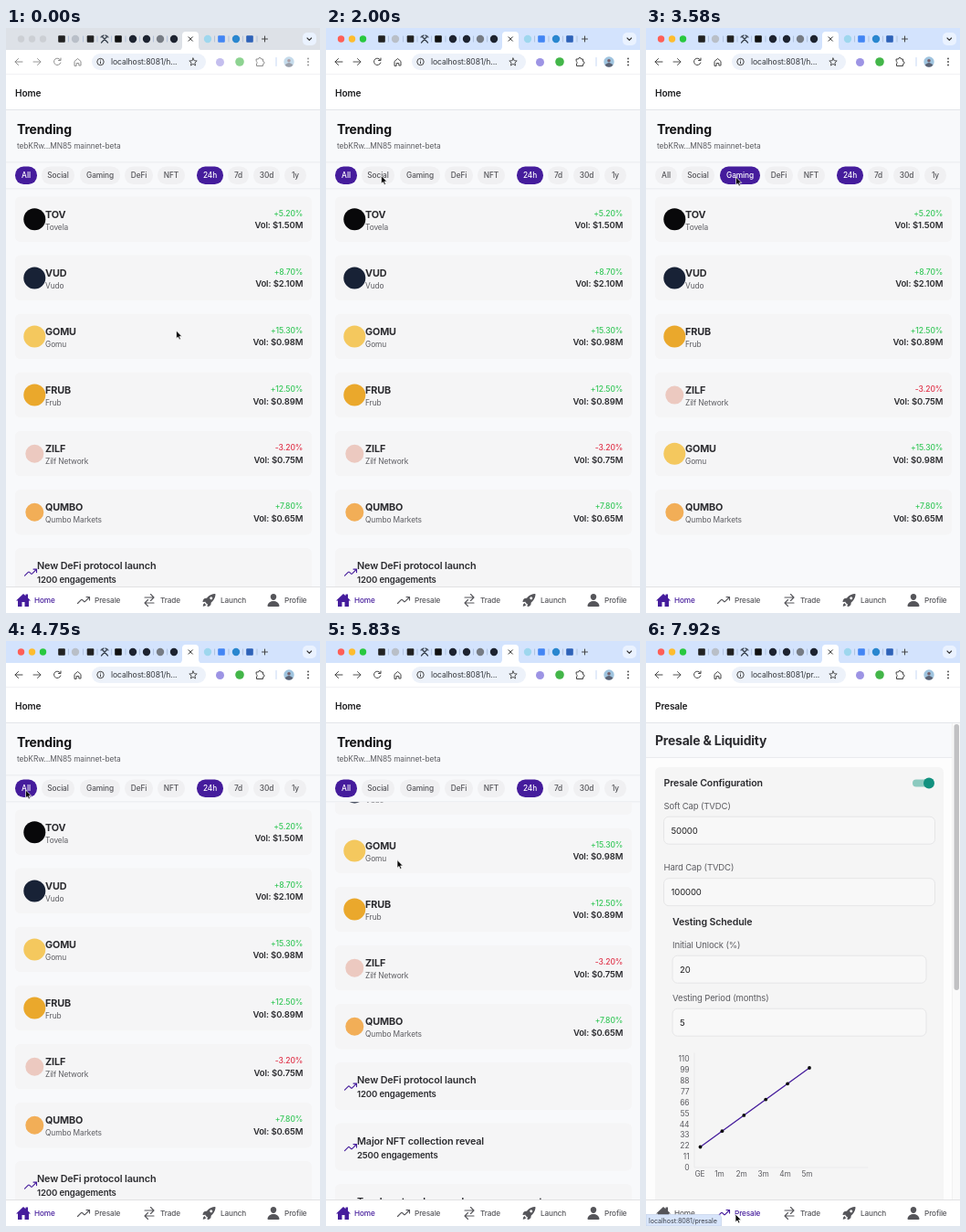
Write an HTML page that moves like this. It is 344x640 px and loops after 8 s.

```html
<!DOCTYPE html>
<html lang="en">
<head>
<meta charset="utf-8">
<title>Token dashboard</title>
<style>
  html, body { margin: 0; width: 100%; height: 100%; overflow: hidden; background: #fff; }
  svg { display: block; width: 100vw; height: 100vh; }
  text { font-family: Inter, sans-serif; white-space: pre; }
</style>
</head>
<body>
<svg id="stage" viewBox="0 0 344 640" preserveAspectRatio="none"></svg>
<script>
const LOOP = 8000;
const PURPLE = '#451c9c', GREY = '#55555a', MUTED = '#5c5c61', INK = '#2b2b2f';
const stage = document.getElementById('stage');

function add(parent, tag, attrs = {}, content) {
  const node = document.createElementNS('http://www.w3.org/2000/svg', tag);
  for (const key in attrs) node.setAttribute(key, attrs[key]);
  if (content !== undefined) node.textContent = content;
  parent.appendChild(node);
  return node;
}
const group = (parent, attrs) => add(parent, 'g', attrs);
const rect = (parent, x, y, width, height, fill, rx = 0, more = {}) =>
  add(parent, 'rect', { x, y, width, height, fill, rx, ...more });
const circle = (parent, cx, cy, r, fill, more = {}) =>
  add(parent, 'circle', { cx, cy, r, fill, ...more });
const line = (parent, d, stroke, width = 1, more = {}) =>
  add(parent, 'path', { d, stroke, 'stroke-width': width, fill: 'none',
    'stroke-linecap': 'round', 'stroke-linejoin': 'round', ...more });

// Places a label by its vertical centre.
function label(parent, x, middle, content, size, fill = INK, weight = 400, anchor = 'start') {
  return add(parent, 'text', { x, y: middle + size * 0.36, fill, 'font-size': size,
    'font-weight': weight, 'text-anchor': anchor, 'letter-spacing': -size * 0.012 }, content);
}

// Icons are drawn on a 512 unit square and shown at 16 px.
const OUTLINES = {
  trend: 'M352 144h112v112M48 368l121-121q23-22 46 0l50 50q23 22 46 0L448 160',
  swap: 'M304 48l112 112-112 112M398 160H96M208 464L96 352l112-112M114 352h302'
};
const SOLIDS = {
  home: 'M416 175V48h-80v58L256 32 0 272h64v208h144V320h96v160h144V272h64z',
  rocket: 'M478 38C420 20 280 70 207 145q-20 20-36 42C80 180 45 230 32 308q0 12 11 11l87-10q0 25 7 32l34 34q7 7 31 7l-9 87q0 12 11 11c78-13 128-50 121-139q22-16 42-36C441 232 492 100 478 38zM294 218a48 48 0 1 1 68 0a48 48 0 0 1-68 0zM109 353c-45 10-66 55-69 119c64-3 109-24 119-69c-25 10-60 0-50-50z',
  person: 'M256 32c-62 0-108 48-104 113 5 61 51 111 104 111s99-50 104-111C364 80 318 32 256 32zM432 480H80q-38-4-31-40c18-95 107-152 207-152s189 57 207 152q7 36-31 40z'
};
function icon(parent, name, cx, cy, color = 'currentColor') {
  const transform = `translate(${cx} ${cy}) scale(${16 / 512}) translate(-256 -256)`;
  return OUTLINES[name]
    ? line(parent, OUTLINES[name], color, 36, { transform })
    : add(parent, 'path', { d: SOLIDS[name], fill: color, 'fill-rule': 'evenodd', transform });
}

/* ---------- browser frame ---------- */
const frame = group(stage);
const strip = rect(frame, 0, 0, 344, 30, '#d3e3fd');
const lights = ['#ff5f57', '#febc2e', '#28c840'].map((color, i) =>
  ({ color, node: circle(frame, 16.5 + i * 12, 12, 3.7, color) }));

[[61, 's', '#222'], [76, 'c', '#b9bfc8'], [92.5, 's', '#222'], [123, 's', '#111'],
 [139, 'c', '#1d2330'], [154, 'c', '#1d2330'], [169, 'c', '#777c84'], [184, 'c', '#1d2330'],
 [221, 'c', '#9ed7ee'], [236, 's', '#4285f4'], [252, 'c', '#2a87cf'], [267, 's', '#2e62b8']
].forEach(([x, shape, color]) => shape === 's'
  ? rect(frame, x - 3.8, 8.2, 7.6, 7.6, color, 1)
  : circle(frame, x, 12, 4.2, color));
line(frame, 'M105 9l6.500 7M111 9l-6.500 7M104 10l3-2M109 8l3 2', '#39424e', 1.3);
[68.5, 84.5, 100, 115.5, 131, 146.5, 161.5, 176.5, 228.5, 244, 259.5, 275].forEach(x =>
  line(frame, `M${x} 9v6`, '#a3b5d3', 0.7));
add(frame, 'path', { d: 'M189 25q4-1 4-5V8q0-4 4-4h10q4 0 4 4v12q0 4 4 5z', fill: '#fff' });
line(frame, 'M200 9.800l4.400 4.400m0-4.400l-4.400 4.400', '#333', 1);
line(frame, 'M280.500 12h6m-3-3v6', '#444', 1);
rect(frame, 325, 5, 15, 14, '#eaf2ff', 5);
line(frame, 'M330 11l2.300 2.300 2.300-2.300', '#333', 1.1);
rect(frame, 0, 24, 344, 27, '#fff');

const tools = group(frame);
line(tools, 'M18 37h-8m3.500-3.500L10 37l3.500 3.500', '#444', 1);
line(tools, 'M30 37h8m-3.500-3.500L38 37l-3.500 3.500', '#555', 1);
line(tools, 'M59.500 35a3.700 3.700 0 1 0 .3 3M60 33v2.500h-2.500', '#444', 1);
line(tools, 'M75 41v-4.500l3.500-3 3.500 3V41h-2.200v-2.500h-2.600V41z', '#444', 1);
rect(frame, 94, 28, 125, 18, '#edf2fa', 9);
circle(frame, 103.5, 37, 3.7, 'none', { stroke: '#444', 'stroke-width': 1 });
line(frame, 'M103.500 36.800v2M103.500 35v.1', '#444', 1);
const address = label(frame, 115, 37, '', 8.6, '#34373c');
line(frame, 'M205 33l1.200 2.700 3 .3-2.300 2 .7 3-2.600-1.600-2.600 1.600.7-3-2.300-2 3-.3z', '#444', 0.9);
circle(tools, 234.5, 37.5, 4.5, '#9d94e4');
circle(tools, 256, 37, 4.8, '#43b649');
line(tools, 'M274.500 34h2a1.500 1.500 0 0 1 3 0h2v2.500a1.500 1.500 0 0 1 0 3v2h-7v-2.500a1.500 1.500 0 0 0 0-2.500z', '#444', 1);
line(frame, 'M296 32.500v9', '#c7d8f5', 1);
circle(tools, 310, 37, 5.7, '#9fc4df');
add(tools, 'path', { d: 'M305.500 40.500q4.500-5 9 0-1.500 2.200-4.500 2.200t-4.500-2.200z', fill: '#5a6274' });
circle(tools, 310, 35.8, 1.8, '#76606a');
[33.5, 37, 40.5].forEach(y => circle(tools, 331, y, 0.9, '#444'));

rect(stage, 0, 50.5, 344, 39, '#fff');
rect(stage, 0, 50, 344, 0.7, '#ececef');
const pageTitle = label(stage, 10, 71, '', 10.1, '#1c1c1e', 600);

/* ---------- trending page ---------- */
const home = group(stage);
rect(home, 0, 89, 344, 523, '#f8f9fb');
rect(home, 0, 89, 344, 0.8, '#dfe1e5');
label(home, 12, 111, 'Trending', 14, '#0f0f11', 700);
label(home, 12, 128.5, 'tebKRw...MN85 mainnet-beta', 8.4, MUTED);
rect(home, 0, 146.5, 344, 0.8, '#e6e8eb');
rect(home, 0, 175.5, 344, 0.8, '#e6e8eb');

const chips = {};
[['All', 10, 24], ['Social', 39, 36], ['Gaming', 81, 44], ['DeFi', 130, 31], ['NFT', 166, 30],
 ['24h', 209, 29], ['7d', 243, 23], ['30d', 271, 29], ['1y', 305, 24]].forEach(([name, x, width]) => {
  chips[name] = {
    pill: rect(home, x, 151.6, width, 19.3, '', 9.3),
    text: label(home, x + width / 2, 161.3, name, 8.3, '', 500, 'middle')
  };
});

const clip = add(add(stage, 'defs'), 'clipPath', { id: 'list' });
rect(clip, 0, 176.3, 344, 435, '#000');
const list = group(group(home, { 'clip-path': 'url(#list)' }));

const TOKENS = [
  ['TOV', 'Tovela', '+5.20%', '1.50', '#08080a'],
  ['VUD', 'Vudo', '+8.70%', '2.10', '#182236'],
  ['GOMU', 'Gomu', '+15.30%', '0.98', '#f4c85e'],
  ['FRUB', 'Frub', '+12.50%', '0.89', '#eaa82c'],
  ['ZILF', 'Zilf Network', '-3.20%', '0.75', '#ecc9c0'],
  ['QUMBO', 'Qumbo Markets', '+7.80%', '0.65', '#f2ae57']
];
const POSTS = [
  ['New DeFi protocol launch', 1200],
  ['Major NFT collection reveal', 2500],
  ['Tovela network upgrade announcement', 5000]
];
const TOKEN_STEP = 64.1, POST_STEP = 66.5, LIST_TOP = 184.5;

const tokenRows = TOKENS.map(([ticker, name, change, volume, color], i) => {
  const row = group(list);
  rect(row, 10, 0, 325, 49.4, '#f5f5f6', 5.5);
  circle(row, 31.3, 24.8, i > 3 ? 10 : 12, color);
  label(row, 43, 19.2, ticker, 10.8, INK, 700);
  label(row, 43, 33.2, name, 8.4, MUTED);
  label(row, 325.3, 18, change, 8.6, change[0] === '+' ? '#35c759' : '#e0354b', 500, 'end');
  label(row, 325.3, 31.3, `Vol: $${volume}M`, 9.5, INK, 600, 'end');
  return row;
});
const postRows = POSTS.map(([title, count]) => {
  const row = group(list);
  rect(row, 10, 0, 325, 51.8, '#f5f5f6', 5.5);
  icon(row, 'trend', 27, 26.5, PURPLE);
  label(row, 34, 19.3, title, 10.8, INK, 600);
  label(row, 34, 34.8, `${count} engagements`, 9.6, INK, 600);
  return row;
});

const FILTERS = {
  All: { tokens: [0, 1, 2, 3, 4, 5], posts: true },
  Social: { tokens: [], posts: true },
  Gaming: { tokens: [0, 1, 3, 4, 2, 5], posts: false }
};

function place(row, y) {
  row.setAttribute('display', y === null ? 'none' : 'inline');
  if (y !== null) row.setAttribute('transform', `translate(0 ${LIST_TOP + y})`);
}
function applyFilter(name) {
  const { tokens, posts } = FILTERS[name];
  tokenRows.forEach((row, i) => {
    const slot = tokens.indexOf(i);
    place(row, slot < 0 ? null : slot * TOKEN_STEP);
  });
  postRows.forEach((row, i) => place(row, posts ? tokens.length * TOKEN_STEP + i * POST_STEP : null));
  for (const key in chips) {
    const active = key === name || key === '24h';
    chips[key].pill.setAttribute('fill', active ? PURPLE : '#f0f0f2');
    chips[key].text.setAttribute('fill', active ? '#fff' : GREY);
  }
}

/* ---------- presale page ---------- */
const presale = group(stage);
rect(presale, 0, 89, 344, 523, '#fdfdfd');
rect(presale, 0, 89, 336, 38, '#f8f9fb');
rect(presale, 0, 89, 344, 0.8, '#dfe1e5');
rect(presale, 0, 127, 336, 0.8, '#e6e8eb');
label(presale, 10, 108.5, 'Presale & Liquidity', 13.9, INK, 700);
rect(presale, 10, 138, 316, 490, '#f5f5f5', 5.5);
label(presale, 19.5, 155.5, 'Presale Configuration', 10.6, INK, 600);
rect(presale, 292, 151.5, 22, 8, '#8ccabf', 4);
circle(presale, 310, 155.5, 6, '#12917f');

function field(x, width, y, name, value) {
  label(presale, x, y, name, 9.5, MUTED);
  rect(presale, x, y + 11.7, width, 30, '#f8f8f8', 5.5, { stroke: '#e1e1e3', 'stroke-width': 0.8 });
  label(presale, x + 8, y + 26.8, value, 9.5, '#1c1c1e');
}
field(19.5, 297, 180.5, 'Soft Cap (TVDC)', '50000');
field(19.5, 297, 248, 'Hard Cap (TVDC)', '100000');
label(presale, 29, 307.5, 'Vesting Schedule', 10.6, INK, 600);
field(29, 278, 332.5, 'Initial Unlock (%)', '20');
field(29, 278, 390.5, 'Vesting Period (months)', '5');

line(presale, 'M53 451v125h190', '#e5e5e7', 0.7);
for (let i = 0; i <= 10; i++)
  label(presale, 47.5, 576 - i * 11.88, String(i * 11), 8.5, MUTED, 400, 'end');
['GE', '1m', '2m', '3m', '4m', '5m'].forEach((name, i) =>
  label(presale, i ? 56.5 + i * 24 : 59, 583.5, name, 8.3, MUTED, 400, 'middle'));
line(presale, 'M59.500 553.500L179 467', PURPLE, 1.3);
for (let i = 0; i < 6; i++) circle(presale, 59.5 + i * 23.9, 553.5 - i * 17.3, 1.9, '#0b0b0d');

rect(presale, 335.5, 90, 8.5, 522, '#fafafa');
rect(presale, 335.5, 90, 0.5, 522, '#e8e8e8');
rect(presale, 337.5, 91, 5.5, 291, '#c1c1c3', 2.75);

/* ---------- bottom tabs, status bubble, pointer ---------- */
rect(stage, 0, 611, 344, 29, '#fff');
rect(stage, 0, 611, 344, 0.8, '#dadadd');
const tabs = [['home', 'Home', 19, 31], ['trend', 'Presale', 85, 97], ['swap', 'Trade', 157, 169],
  ['rocket', 'Launch', 222.5, 235], ['person', 'Profile', 293, 305]].map(([shape, name, cx, x]) => {
  const tab = group(stage);
  icon(tab, shape, cx, 626);
  label(tab, x, 626.3, name, 8.2, 'currentColor', 500);
  return tab;
});

const status = group(stage);
add(status, 'path', { d: 'M0 627.500h79q3.500 0 3.500 3.500v9H0z', fill: '#d8e5fb', stroke: '#bccbe4', 'stroke-width': 0.6 });
label(status, 3, 634, 'localhost:8081/presale', 7.2, '#3c4048');

const pointer = add(stage, 'path', {
  d: 'M0 0v8.800l2-1.800 1.400 3 1.500-.7-1.300-2.900h2.700z',
  fill: '#0a0a0a', stroke: '#fff', 'stroke-width': 0.7, 'stroke-linejoin': 'round'
});

/* ---------- timeline ---------- */
const PATH = [[0, 186.5, 331], [1150, 186.5, 331], [1850, 60.5, 161.5], [2750, 60.5, 161.5],
  [3150, 98.5, 163], [3850, 98.5, 163], [4400, 21.5, 163], [4900, 21.5, 163],
  [5300, 78, 239.5], [6800, 78, 239.5], [7620, 98, 627], [LOOP, 98, 627]];
const FILTER_STEPS = [[0, 'All'], [2170, 'Social'], [3250, 'Gaming'], [4500, 'All']];
const ACTIVATE = 1000, HOVER = 7670, OPEN = 7750;
const SCROLL = { start: 5500, time: 775, distance: 160.8 };

const clamp = value => Math.min(1, Math.max(0, value));
const ease = u => u * u * (3 - 2 * u);
const show = (node, on) => node.setAttribute('display', on ? 'inline' : 'none');

function pointerAt(t) {
  const i = Math.max(1, PATH.findIndex(step => step[0] > t));
  const [t0, x0, y0] = PATH[i - 1], [t1, x1, y1] = PATH[i];
  const u = ease((t - t0) / (t1 - t0));
  return [x0 + (x1 - x0) * u, y0 + (y1 - y0) * u];
}

function render(t) {
  const focused = t >= ACTIVATE, opened = t >= OPEN;
  strip.setAttribute('fill', focused ? '#d3e3fd' : '#dde1e7');
  lights.forEach(({ node, color }) => node.setAttribute('fill', focused ? color : '#cccfd4'));
  tools.setAttribute('opacity', focused ? 1 : 0.6);

  applyFilter(FILTER_STEPS.filter(step => step[0] <= t).pop()[1]);
  const left = 1 - clamp((t - SCROLL.start) / SCROLL.time);
  list.setAttribute('transform', `translate(0 ${-SCROLL.distance * (1 - left * left)})`);

  show(home, !opened);
  show(presale, opened);
  show(status, t >= HOVER);
  pageTitle.textContent = opened ? 'Presale' : 'Home';
  address.textContent = `localhost:8081/${opened ? 'pr' : 'h'}...`;
  tabs.forEach((tab, i) => tab.setAttribute('color', i === (opened ? 1 : 0) ? PURPLE : GREY));
  pointer.setAttribute('transform', `translate(${pointerAt(t).join(' ')})`);
}

const began = performance.now();
function tick() {
  render((performance.now() - began) % LOOP);
  requestAnimationFrame(tick);
}
tick();
</script>
</body>
</html>
```
